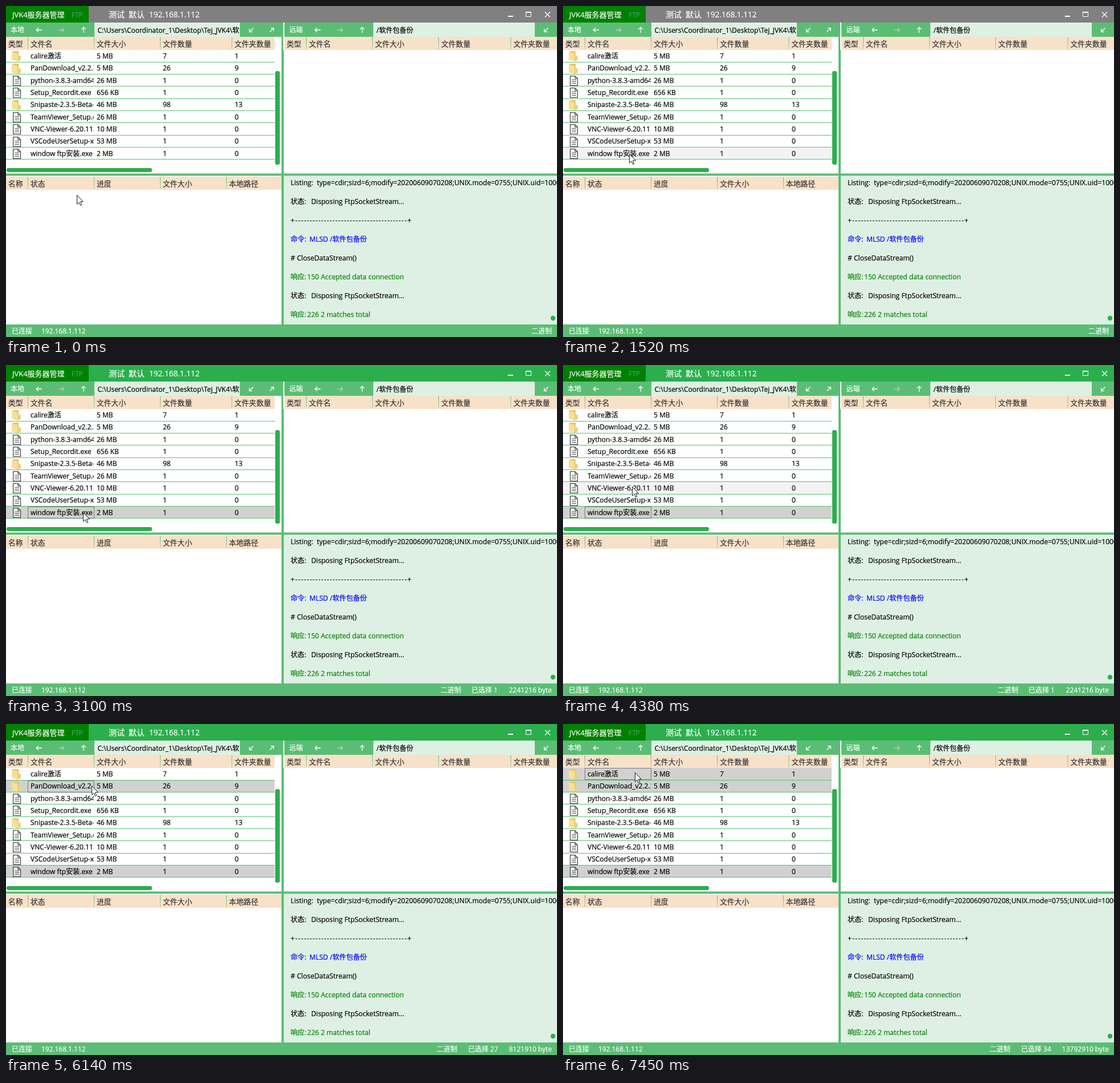
Animation of 966 by 580 pixels, one loop 8000 ms. Source, as an HTML page:

```html
<!DOCTYPE html>
<html lang="zh-CN">
<head>
<meta charset="utf-8">
<title>FTP</title>
<style>
html, body { margin: 0; width: 100%; height: 100%; overflow: hidden; background: #fff; }
svg { display: block; width: 966px; height: 580px; }
text { font: 12px "Open Sans", "Noto Sans CJK SC", "Noto Sans CJK", sans-serif; white-space: pre; stroke-width: .2px; }
</style>
</head>
<body>
<svg id="stage" viewBox="0 0 966 580"></svg>
<script>
const GREEN = '#5bbd75', DEEP = '#2cae4d', MINT = '#def0e3', PEACH = '#f8e1c9';
const LOOP = 8000, ROW_TOP = 76.9, ROW_H = 64 / 3;

const rect = (x, y, w, h, fill, more = '') =>
  `<rect x="${x}" y="${y}" width="${w}" height="${h}" fill="${fill}" ${more}/>`;
const text = (x, y, s, fill = '#000', size = 12, more = '') =>
  `<text x="${x}" y="${y}" fill="${fill}" stroke="${fill}" style="font-size:${size}px" ${more}>${s}</text>`;
const line = (d, stroke = '#fff', width = 1.2, more = '') =>
  `<path d="${d}" fill="none" stroke="${stroke}" stroke-width="${width}" ${more}/>`;

// Arrow pointing left, turned around its centre.
const arrow = (x, y, angle, color = '#fff') =>
  `<g transform="translate(${x} ${y}) rotate(${angle})">${line('M5 0H-4.5M-1-3.7L-4.7 0L-1 3.7', color, 1.3)}</g>`;

const lineY = i => Math.floor(ROW_TOP + i * ROW_H);

const files = [
  ['calire激活', '5 MB', 7, 1],
  ['PanDownload_v2.2.2', '5 MB', 26, 9],
  ['python-3.8.3-amd64', '26 MB', 1, 0],
  ['Setup_Recordit.exe', '656 KB', 1, 0],
  ['Snipaste-2.3.5-Beta-x', '46 MB', 98, 13],
  ['TeamViewer_Setup.exe', '26 MB', 1, 0],
  ['VNC-Viewer-6.20.113', '10 MB', 1, 0],
  ['VSCodeUserSetup-x64', '53 MB', 1, 0],
  ['window ftp安装.exe', '2 MB', 1, 0]
];

const folderIcon = y => `<g transform="translate(10 ${y + 3})">
  <path d="M1 1.5L3 0H12V14H1Z" fill="#e6c566"/>
  <path d="M0 1.5L10 3.5V18L0 15.5Z" fill="#f6e09a"/>
  <path d="M10 9L16 8V16L10 18Z" fill="#ecd17c"/></g>`;

const fileIcon = y => `<g transform="translate(12 ${y + 3})">
  <path d="M.7 .7H9L13.5 5.2V17.3H.7Z" fill="#fff" fill-opacity=".6" stroke="#484848" stroke-width="1.3"/>
  ${line('M9 1V5.2H13.2M3.5 7.5H11M3.5 10.5H11M3.5 13.5H11', '#484848', 1.2)}</g>`;

function fileRow([name, size, count, folders], i) {
  const y = lineY(i), next = lineY(i + 1), base = Math.round(ROW_TOP + i * ROW_H + 15);
  return rect(0, y + 1, 471, next - y - 1, '#fff', `id="row${i}"`) +
    (folders ? folderIcon(y) : fileIcon(y)) +
    text(43, base, name, '#000', 12, 'clip-path="url(#nameCol)"') +
    text(159, base, size) + text(275, base, count) + text(401, base, folders) +
    rect(0, next, 471, 1, GREEN);
}

function header(x, y, width, labels) {
  return rect(x, y, width, 23, PEACH) + labels.map(([dx, s], i) =>
    (i ? rect(x + dx - 5, y + 1, 1, 21, 'url(#divider)') : '') +
    text(x + dx, y + 16.5, s, '#333', 12.8)).join('');
}

function toolbar(x, label, fieldX, fieldW, path) {
  return text(x + 8, 46, label, '#fff') + arrow(x + 58, 42, 0) +
    arrow(x + 97, 42, 180, '#b4c9b9') + arrow(x + 136, 42, 90) +
    rect(fieldX, 29, fieldW, 25, MINT) + text(fieldX + 5.5, 46.5, path);
}

const log = [
  ['Listing:', 545, 'type=cdir;sizd=6;modify=20200609070208;UNIX.mode=0755;UNIX.uid=1000'],
  ['状态:', 535, 'Disposing FtpSocketStream...'],
  ['+' + '-'.repeat(39) + '+'],
  ['命令:', 532, 'MLSD /软件包备份', '#00f'],
  ['# CloseDataStream()'],
  ['响应:', 528, '150 Accepted data connection', '#008000'],
  ['状态:', 535, 'Disposing FtpSocketStream...'],
  ['响应:', 528, '226 2 matches total', '#008000']
];
const logLine = ([label, x, s, color], i) => {
  const y = 314.3 + i * 32.9;
  const spacing = label[0] === '+' ? 'letter-spacing="1.15"' : '';
  return text(499, y, label, color, 12.1, spacing) + (s ? text(x, y, s, color, 12.1) : '');
};

const stage = document.getElementById('stage');
stage.innerHTML = `<defs>
  <clipPath id="nameCol"><rect x="38" y="77" width="115.5" height="200"/></clipPath>
  <linearGradient id="divider" x2="0" y2="1">
    <stop stop-color="${GREEN}"/><stop offset="1" stop-color="${GREEN}" stop-opacity=".45"/>
  </linearGradient></defs>` +
  rect(0, 0, 966, 580, '#fff') +
  rect(0, 0, 966, 29, DEEP, 'id="titleBar"') +
  rect(0, 0, 145, 29, '#008000') +
  text(11, 20, 'JVK4服务器管理', '#fff', 13) + text(115, 19.5, 'FTP', '#3fa565', 12) +
  text(180, 20, '测试', '#fff', 14) + text(215, 20, '默认', '#fff', 14) +
  text(251, 20, '192.168.1.112', '#fff', 13.6) +
  line('M880 18H889', '#fff', 2) + line('M911.5 11V18.5H920.5V11', '#fff', 1) + line('M911 11H921', '#fff', 2) +
  line('M945 10.5L954 19.5M954 10.5L945 19.5', '#fff', 1.4) +
  rect(0, 29, 966, 25, GREEN) +
  toolbar(0, '本地', 155, 255, 'C:\\Users\\Coordinator_1\\Desktop\\Tej_JVK4\\软') +
  toolbar(488.5, '远端', 644, 283, '/软件包备份') +
  rect(410, 29, 77, 25, GREEN) +
  arrow(430, 42, -45) + arrow(466, 42, 135) + arrow(947, 42, -45) +
  header(0, 54, 471, [[4, '类型'], [43, '文件名'], [159, '文件大小'], [275, '文件数量'], [400.5, '文件夹数量']]) +
  header(488, 54, 478, [[4, '类型'], [43, '文件名'], [159, '文件大小'], [275, '文件数量'], [401.5, '文件夹数量']]) +
  files.map(fileRow).join('') +
  rect(38.5, 0, 116, 20, 'none', 'id="focus" stroke="#222" stroke-dasharray="1 1"') +
  rect(472, 114, 8, 164, DEEP, 'rx="3"') + rect(1, 284, 255, 7, DEEP, 'rx="3"') +
  header(0, 299, 483, [[4, '名称'], [43, '状态'], [159, '进度'], [275, '文件大小'], [391, '本地路径']]) +
  rect(487, 298, 479, 260, MINT) + log.map(logLine).join('') +
  `<circle cx="959" cy="547" r="4.2" fill="${DEEP}"/>` +
  rect(483, 54, 4, 504, GREEN) + rect(0, 293.5, 966, 4, GREEN) +
  rect(486, 29, 2, 48, '#fff') +
  rect(0, 558, 966, 22, GREEN) +
  text(10, 574, '已连接', '#fff') + text(62, 574, '192.168.1.112', '#fff', 11.9) +
  text(0, 574, '二进制', '#fff', 12, 'id="mode"') +
  text(0, 574, '', '#fff', 12, 'id="picked"') +
  text(957, 574, '', '#fff', 12, 'id="bytes" text-anchor="end"') +
  `<path id="cursor" d="M.5 .5V16.2L4 12.8L6.4 18.4L8.8 17.4L6.4 11.9H11.4Z"
    fill="#fff" stroke="#16162a" stroke-width="1" stroke-linejoin="round"/>`;

// Pointer stops: time, x, y.
const stops = [
  [0, 124, 331], [120, 114, 304], [240, 106, 281], [390, 107, 278], [510, 110, 272],
  [630, 113, 266], [780, 115, 264], [1370, 115, 262], [1520, 116, 259], [2210, 119, 258],
  [2330, 124, 258], [2480, 129, 258], [2640, 135, 258], [3530, 136, 253], [3660, 137, 248],
  [3800, 134, 234], [3920, 128, 219], [4070, 122, 213], [4380, 121, 213], [4520, 129, 215],
  [4650, 138, 210], [4920, 139, 210], [5070, 140, 202], [5200, 143, 172], [5320, 144, 149],
  [5460, 147, 128], [5580, 150, 109], [5980, 150, 108], [6440, 134, 102], [6590, 126, 88],
  [6740, 126, 85]
];
const selections = [
  { at: 0, rows: [], modeX: 921 },
  { at: 3100, rows: [8], modeX: 762, pickedX: 816, count: 1, bytes: 2241216 },
  { at: 6140, rows: [8, 1], modeX: 755, pickedX: 810, count: 27, bytes: 8121910 },
  { at: 7450, rows: [8, 1, 0], modeX: 748, pickedX: 803, count: 34, bytes: 13792910 }
];

const el = id => document.getElementById(id);
const set = (id, attrs) => Object.entries(attrs).forEach(([k, v]) => el(id).setAttribute(k, v));

function render(t) {
  const [, x, y] = stops.findLast(s => s[0] <= t);
  const sel = selections.findLast(s => s.at <= t);
  const hovered = Math.floor((y - ROW_TOP) / ROW_H);
  const active = sel.rows.length > 0;

  set('cursor', { transform: `translate(${x} ${y})` });
  set('titleBar', { fill: active ? DEEP : '#808080' });
  files.forEach((_, i) => set('row' + i, {
    fill: sel.rows.includes(i) ? '#d1d1d1' : i === hovered ? '#f3f3f3' : '#fff'
  }));
  set('focus', {
    visibility: active ? 'visible' : 'hidden',
    y: active ? lineY(sel.rows.at(-1)) + 1.5 : 0
  });
  set('mode', { x: sel.modeX });
  set('picked', { x: sel.pickedX || 0 });
  el('picked').textContent = active ? `已选择 ${sel.count}` : '';
  el('bytes').textContent = active ? `${sel.bytes} byte` : '';
}

const start = performance.now();
function tick() {
  render((performance.now() - start) % LOOP);
  requestAnimationFrame(tick);
}
tick();
</script>
</body>
</html>
```
